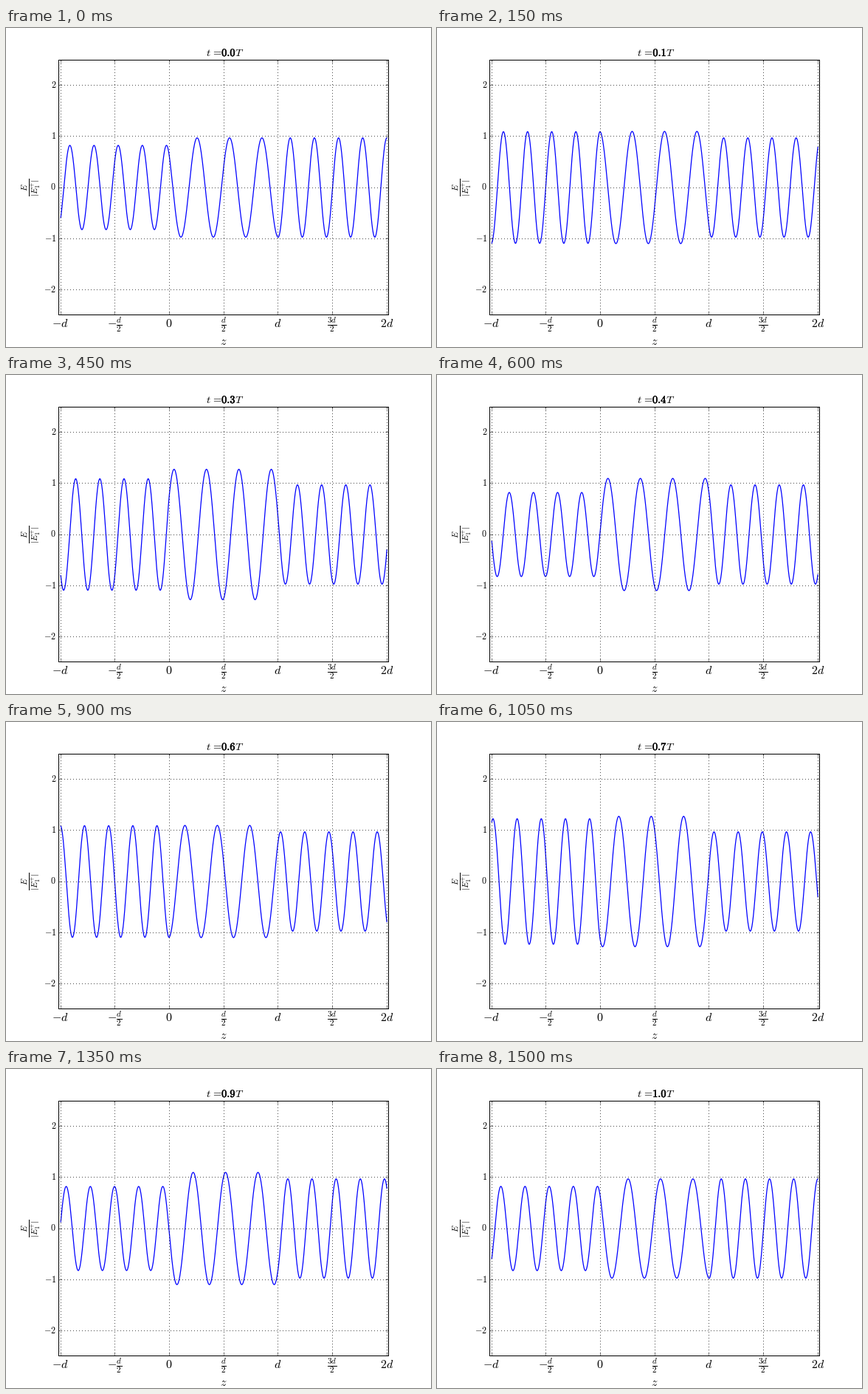
Write a matplotlib script that moves like this. It is 576 px wide and 432 px high and loops after 1650 ms.

```python
import numpy as np
import matplotlib.pyplot as plt
from matplotlib.animation import FuncAnimation
from matplotlib.patheffects import withStroke

plt.style.use("classic")
plt.rcParams["figure.facecolor"] = "white"
plt.rcParams["mathtext.fontset"] = "cm"

WIDTH, HEIGHT, DPI = 576, 432, 72
STEPS = 11

# Lengths are in units of the slab thickness d.
K_OUT = 9 * np.pi
INDEX_RATIO = np.sqrt(1.8)
K_SLAB = K_OUT / INDEX_RATIO


def wave(z, edge, k, value, slope):
    """Solution of the wave equation with given value and slope at an edge."""
    return value * np.cos(k * (z - edge)) + slope / k * np.sin(k * (z - edge))


def stationary_field(z):
    """Complex field of a unit wave passing through the slab 0 < z < 1."""
    mismatch = (INDEX_RATIO - 1 / INDEX_RATIO) / 2 * np.sin(K_SLAB)
    transmitted = 1 / np.sqrt(1 + mismatch**2)
    exit_value = transmitted * np.exp(1j * K_OUT)
    exit_slope = 1j * K_OUT * exit_value

    entry_value = wave(0, 1, K_SLAB, exit_value, exit_slope)
    entry_slope = (K_SLAB * exit_value * np.sin(K_SLAB)
                   + exit_slope * np.cos(K_SLAB))

    before = wave(z, 0, K_OUT, entry_value, entry_slope)
    inside = wave(z, 1, K_SLAB, exit_value, exit_slope)
    after = transmitted * np.exp(1j * K_OUT * z)
    return np.where(z < 0, before, np.where(z < 1, inside, after))


fig = plt.figure(figsize=(WIDTH / DPI, HEIGHT / DPI), dpi=DPI)


def add_plot_area(dx=0, dy=0):
    """Transparent axes, moved by dx, dy pixels from the plot's place."""
    ax = fig.add_axes([0.125 + dx / WIDTH, 0.1 + dy / HEIGHT, 0.775, 0.8])
    ax.patch.set_visible(False)
    ax.set_xlim(-1.015, 2.015)
    ax.set_ylim(-2.5, 2.5)
    return ax


def label(x, y, text, size, ha="center", va="baseline", **style):
    """Place text at pixel coordinates measured from the top left."""
    return fig.text(x / WIDTH, 1 - y / HEIGHT, text, fontsize=size,
                    ha=ha, va=va, **style)


plot = add_plot_area()
plot.set_axis_off()

# Half a pixel makes frame and grid snap to the pixel that contains them.
frame = add_plot_area(-0.51, 0.49)
frame.grid(True, linestyle=(0.5, (1, 3)), linewidth=0.7)


def to_pixels(x, y):
    px, py = frame.transData.transform((x, y))
    return px, HEIGHT - py


x_names = ["-d", r"-\frac{d}{2}", "0", r"\frac{d}{2}", "d",
           r"\frac{3d}{2}", "2d"]
x_ticks = np.linspace(-1, 2, len(x_names))
y_ticks = range(-2, 3)
frame.set_xticks(x_ticks, labels=[])
frame.set_yticks(y_ticks, labels=[])

for tick, name in zip(x_ticks, x_names):
    label(to_pixels(tick, 0)[0], 405.4, f"${name}$", 16)
for tick in y_ticks:
    label(68, to_pixels(0, tick)[1] + 3.9, f"${tick}$", 12, ha="right")

label(295.2, 429, "$z$", 16)
label(34.5, 215.5, r"$\frac{E}{|E_1^{+}|}$", 16, va="center", rotation=90)

label(271, 38, r"$t\hspace{0.117}=$", 14.4, ha="left")
label(321.8, 38, "$T$", 14.4, ha="right")
clock = label(302, 38, "", 14.4,
              path_effects=[withStroke(linewidth=0.5, foreground="black")])

z = np.linspace(-1, 2, 1501)
field = stationary_field(z)
curve, = plot.plot(z, field.real, color="blue", linewidth=1.25)


def update(step):
    time = step / 10
    curve.set_ydata((field * np.exp(-2j * np.pi * time)).real)
    clock.set_text(r"$\mathbf{%.1f}$" % time)
    return curve, clock


animation = FuncAnimation(fig, update, frames=STEPS, interval=150,
                          repeat=True, repeat_delay=0)
plt.show()
```
